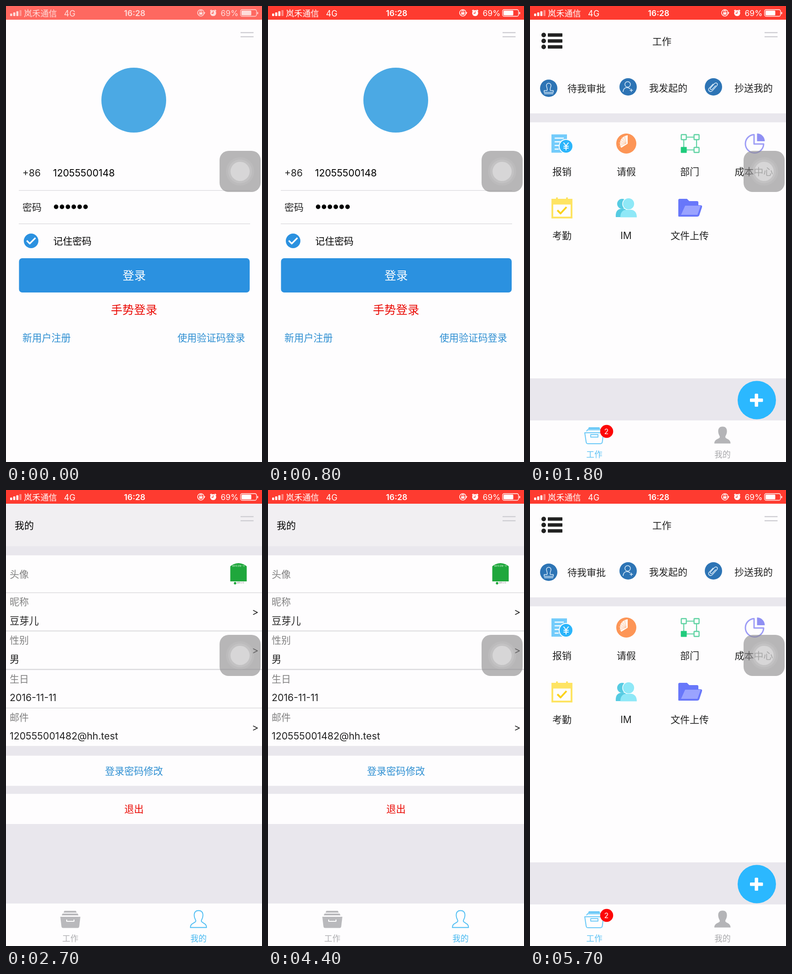
An HTML page for the animation above (5800 ms loop, 561 px wide and 998 px high).

```html
<!DOCTYPE html>
<html lang="zh-CN">
<head>
<meta charset="utf-8">
<title>App demo</title>
<style>
  html, body { margin: 0; width: 100%; height: 100%; overflow: hidden; background: #fefdfe; }
  svg { display: block; width: 100vw; height: 100vh; }
  text { font-family: Inter, "Noto Sans CJK SC", "Noto Sans CJK", sans-serif; }
</style>
</head>
<body>
<svg id="stage" viewBox="0 0 561 998" xmlns="http://www.w3.org/2000/svg"></svg>
<script>
const LOOP = 5800;
const PAPER = '#fefdfe', GRAY = '#e9e7ed', BLUE = '#2b91e0', INK = '#222', RED = '#ea0a04';

// Shape helpers
const attrs = o => Object.entries(o).map(([k, v]) => `${k}="${v}"`).join(' ');
const rect = (x, y, w, h, fill, extra = {}) =>
  `<rect x="${x}" y="${y}" width="${w}" height="${h}" fill="${fill}" ${attrs(extra)}/>`;
const dot = (x, y, r, fill, extra = {}) =>
  `<circle cx="${x}" cy="${y}" r="${r}" fill="${fill}" ${attrs(extra)}/>`;
const shape = (d, fill) => `<path d="${d}" fill="${fill}"/>`;
const line = (d, color, width = 2) =>
  `<path d="${d}" fill="none" stroke="${color}" stroke-width="${width}" stroke-linejoin="round"/>`;
// Text is placed by the middle of its glyph height
const text = (x, cy, size, str, fill = INK, anchor = 'start', weight = 400) =>
  `<text x="${x}" y="${cy + size * 0.37}" font-size="${size}" fill="${fill}" text-anchor="${anchor}" font-weight="${weight}">${str}</text>`;
const mid = (x, cy, size, str, fill, weight) => text(x, cy, size, str, fill, 'middle', weight);
const group = (id, body) => `<g id="${id}">${body}</g>`;

function loginPage() {
  const dots = Array.from({ length: 6 }, (_, i) => dot(109.8 + 12.9 * i, 439.5, 4.9, '#000')).join('');
  return dot(280, 206, 71, '#4ba9e4') +
    text(36, 365, 21, '+86') + text(103, 365, 21.3, '12055500148', '#000') +
    rect(28, 403, 507, 1.3, '#d9d9dc') +
    text(36, 440.5, 21, '密码') + dots +
    rect(28, 476, 507, 1.3, '#d9d9dc') +
    dot(55, 514, 16, BLUE) + line('M45.5 513.5L52 520L64.5 507.5', '#fff', 3.3) +
    text(103.5, 514.5, 21, '记住密码', '#000') +
    rect(28.5, 552, 505.5, 75, BLUE, { rx: 7 }) +
    mid(281, 589.5, 25.4, '登录', '#fff') +
    mid(280.5, 664.5, 25.4, '手势登录', RED) +
    text(36, 726.5, 21.2, '新用户注册', '#2e8fd2') +
    text(524, 726.5, 21.2, '使用验证码登录', '#2e8fd2', 'end');
}

function listIcon() {
  return [63.5, 76.5, 89.5].map(y => dot(30, y, 5, INK) + rect(39, y - 3.7, 32, 7.4, INK, { rx: 1 })).join('');
}

function shortcuts() {
  const disc = (x, y) => dot(x, y, 19, '#2d74b5');
  const pale = '#d9ecfa';
  return disc(41, 180) +
    line('M31 189V185H37.5C39 180 36 178 36 174A5 5 0 0 1 46 174C46 178 43 180 44.5 185H51V189Z M31 192H51', pale, 1.5) +
    disc(215, 177) +
    dot(214, 171.5, 6, 'none', { stroke: pale, 'stroke-width': 1.5 }) +
    line('M204 188C204 182 208 178.5 212 178.5C216 178.5 218 180 219.5 181.5 M222 181V188 M218.5 184.5H225.5', pale, 1.5) +
    disc(402, 177) +
    line('M396 179L404 170C408 166 413 170 409.5 174.5L399.5 185.5C395 190 388.5 184.5 392.5 180L401.5 170.5 M396 179C393.5 182 397 185 399.5 182L407 174', pale, 1.5) +
    text(82, 180, 21, '待我审批') + text(261, 179, 21, '我发起的') + text(448, 179, 21, '抄送我的');
}

function expenseIcon() {
  return rect(47, 281, 34, 40, '#74ccfb') +
    [[54, 288, 20], [54, 296, 16], [54, 304, 11], [54, 312, 9]].map(([x, y, w]) => rect(x, y, w, 2.4, '#fff')).join('') +
    dot(79, 307, 15, '#2bb5fb', { stroke: '#fff', 'stroke-width': 2 }) +
    line('M73.5 299L79 306L84.5 299 M79 306V316 M73.5 307H84.5 M73.5 311H84.5', '#fff', 1.9);
}

function leaveIcon() {
  const rays = [0, 1, 2, 3, 4].map(i => {
    const a = Math.PI * (0.9 + i * 0.13);
    return `M211 301L${211 + 17 * Math.cos(a)} ${301 + 17 * Math.sin(a)}`;
  }).join('');
  return dot(211, 301, 22, '#fd9556') +
    shape('M213.5 283V301L199.5 310A18 18 0 0 1 213.5 283Z', '#fff3eb') + line(rays, '#fdc39f', 1) +
    line('M213 283V301L199.5 309.5', '#fff', 2);
}

function deptIcon() {
  const green = '#5ed2a2';
  return line('M337 287H365V315H337Z', green, 2.2) +
    [[337, 287], [365, 287], [365, 315]].map(([x, y]) =>
      rect(x - 5.5, y - 5.5, 11, 11, PAPER, { stroke: green, 'stroke-width': 2.4, rx: 1 })).join('') +
    rect(330.5, 308.5, 13, 13, '#1fcb7c', { rx: 1 });
}

function costIcon() {
  return line('M491 281.5A20 20 0 1 0 512 302H491Z', '#9d9cf6', 3) +
    shape('M497.5 279A17 17 0 0 1 514.5 296H497.5Z', '#8f8ff3');
}

function calendarIcon() {
  const sun = '#fee463';
  return rect(47, 422, 46, 43, sun) + rect(51, 434.5, 38, 26.5, PAPER) +
    rect(57, 419, 4, 6, sun) + rect(79, 419, 4, 6, sun) +
    line('M60 447L67 454L80 440', '#fbd21c', 4);
}

function peopleIcon() {
  return dot(202, 433, 11, '#56cbe2') +
    shape('M188 462C187 451 191 445 199 444H210V462Z', '#56cbe2') +
    dot(216, 433, 13, '#8fe8f7', { stroke: '#fff', 'stroke-width': 1.5 }) +
    shape('M198 462.5C198 452 203 446.5 210 446H222C230 447 234 453 234 462.5Z', '#8fe8f7');
}

function folderIcon() {
  return shape('M325 460V425Q325 422 328 422H344L349 427H366Q369 427 369 430V436H373Q378 436 377 440L371 458Q370 461 366 461H327Q325 461 325 460Z', '#6877fa') +
    shape('M340 437H374L367 457H331Z', '#9aa3ff');
}

function gridLabels() {
  return [[70, 362, '报销'], [211, 362, '请假'], [350, 362, '部门'], [490.5, 362, '成本中心'],
    [70, 502.5, '考勤'], [210.5, 502, 'IM'], [350, 502.5, '文件上传']]
    .map(([x, y, s]) => mid(x, y, 21, s)).join('');
}

function drawerTab(active) {
  const sky = '#68c8f7', gray = '#b9b9bc';
  if (!active) {
    return shape('M128 921H153L155 925H126Z', gray) + shape('M124 927H157L159 931H122Z', gray) +
      shape('M119 934H163L160.5 955Q160 958.5 157 958.5H125Q122 958.5 121.5 955Z', gray) +
      line('M133 940V944H149V940', '#fff', 2) + mid(141, 981, 17.7, '工作', '#aeaeb1');
  }
  return shape('M129 922H152L154 926H127Z', sky) + line('M124 931L126 927.5H155L157 931', sky, 2) +
    line('M120 934H161L158.5 954Q158 958 154 958H127Q123.5 958 123 954Z', sky, 2) +
    line('M133 938V943.5H149V938Z', sky, 1.8) + mid(141, 981, 17.7, '工作', '#5cc2f5') +
    dot(168, 931, 14.3, '#fd0606') + mid(167.5, 931, 16, '2', '#fff');
}

function personTab(active) {
  const body = 'M422 920.5C429 920.5 432 925 431.5 932C431 938 428.5 940 428 943C428 948 439.5 947 439.5 957.5H404C404 947 416 948 416 943C415.5 940 413 938 412.5 932C412 925 415 920.5 422 920.5Z';
  return (active ? line(body, '#4dbdf3', 1.9) : shape(body, '#b4b4b7')) +
    mid(422, 981, 17.7, '我的', active ? '#45b8f0' : '#a8a8ab');
}

function workPage() {
  return rect(0, 30, 561, 968, PAPER) +
    listIcon() + mid(289, 77, 21, '工作') + shortcuts() +
    rect(0, 235, 561, 19.5, GRAY) +
    expenseIcon() + leaveIcon() + deptIcon() + costIcon() +
    calendarIcon() + peopleIcon() + folderIcon() + gridLabels() +
    rect(0, 815, 561, 92, GRAY) +
    dot(497, 862.5, 42, '#2bb8ff') +
    rect(482, 859, 28.5, 7.5, '#fff', { rx: 1.5 }) + rect(492.5, 848.5, 7.5, 28.5, '#fff', { rx: 1.5 }) +
    drawerTab(true) + personTab(false);
}

function avatar() {
  return shape('M491.5 200V167Q498 161 509.5 160Q521 161 527.5 167V200Z', '#1fa73c') +
    mid(509.5, 167, 4, '美好生活每一天', '#e4f6e6') +
    dot(502, 204, 2.7, '#1fa73c') + text(506, 204, 4, '绿叶小卡', '#777');
}

function minePage() {
  const rows = [[143, 81], [225.5, 82], [309.5, 82], [394, 82.5], [478, 82.5], [581.5, 66], [665, 66]];
  const fields = [[244.5, 286.5, '昵称', '豆芽儿'], [328.5, 370, '性别', '男'],
    [413.5, 454.5, '生日', '2016-11-11'], [497.5, 538.5, '邮件', '120555001482@hh.test']];
  return rect(0, 30, 561, 968, GRAY) + rect(0, 30, 561, 93, '#f1eff2') +
    text(19, 77, 21, '我的', '#000') +
    rect(0, 224, 561, 337, '#dcdbde') +
    rows.map(([y, h]) => rect(0, y, 561, h, PAPER)).join('') +
    text(8, 184, 21, '头像', '#808080') + avatar() +
    fields.map(([y1, y2, label, value]) => text(8, y1, 21, label, '#808080') + text(8, y2, 21.3, value)).join('') +
    [268, 352, 521].map(y => line(`M541.5 ${y - 4.8}L551 ${y}L541.5 ${y + 4.8}`, INK, 1.7)).join('') +
    mid(280.5, 615, 21.2, '登录密码修改', '#2e8fd2') + mid(280.5, 698.5, 21.2, '退出', RED) +
    rect(0, 905, 561, 93, PAPER) + drawerTab(false) + personTab(true);
}

function statusBar() {
  const bars = [0, 1, 2, 3].map(i =>
    rect(9 + 6.8 * i, 16.5 - 2.5 * i, 4.6, 5.5 + 2.5 * i, '#fff', { rx: 1, opacity: i < 3 ? 1 : 0.4 })).join('');
  const signs = bars +
    text(39, 16, 18.2, '岚禾通信', '#fff') + text(127, 16, 18, '4G', '#fff') +
    mid(282, 15.5, 17.7, '16:28', '#fff', 600) +
    dot(427, 15, 7, 'none', { stroke: '#fff', 'stroke-width': 1.6 }) +
    rect(423.5, 14, 7, 5, '#fff') + line('M425 14V12A2 2 0 0 1 429 12V14', '#fff', 1.3) +
    shape('M431.5 14H437L434 18Z', '#fff') +
    dot(454, 15.5, 6.6, '#fff') + line('M447.5 11L450.5 8.5 M457.5 8.5L460.5 11', '#fff', 2.2) +
    line('M454 11.5V16H450.5', '#fe3b30', 1.3) +
    text(470.5, 15.5, 17.5, '69%', '#fff') +
    rect(514, 8, 35, 14.5, 'none', { rx: 3.5, stroke: '#fff', 'stroke-width': 1.3 }) +
    rect(516, 10, 21.5, 10.5, '#fff', { rx: 1.5 }) + rect(550.5, 13, 2, 5, '#fff', { rx: 1 });
  return rect(0, 0, 561, 30, '#fe3b30') + rect(0, 0, 561, 30, '#fff', { id: 'veil' }) + group('signs', signs);
}

function floating() {
  return line('M514 58.3H542.5 M514 67.3H542.5', '#d0cfd4', 2.4) +
    rect(468, 317, 90, 90, '#8c8a8c', { rx: 20, opacity: 0.61 }) +
    dot(513, 362, 31, '#fff', { opacity: 0.07 }) +
    dot(513, 362, 26, '#fff', { opacity: 0.1 }) +
    dot(513, 362, 21, '#fff', { opacity: 0.32 });
}

document.getElementById('stage').innerHTML = rect(0, 0, 561, 998, PAPER) +
  group('login', loginPage()) + group('work', workPage()) + group('mine', minePage()) +
  floating() + statusBar();

const [login, work, mine, veil, signs] =
  ['login', 'work', 'mine', 'veil', 'signs'].map(id => document.getElementById(id));

// Each step holds until the next: start, page, form offset, status bar fade
const steps = [
  [0, login, 0, 0.23],
  [100, login, 0, 0.1],
  [200, login, 0, 0],
  [1000, login, 30, 0],
  [1200, work, 0, 0],
  [2600, mine, 0, 0],
  [4600, work, 0, 0],
];

function draw(now) {
  const t = now % LOOP;
  const [, page, offset, fade] = steps.filter(s => s[0] <= t).pop();
  for (const p of [login, work, mine]) p.style.display = p === page ? '' : 'none';
  login.setAttribute('transform', `translate(0 ${offset})`);
  veil.setAttribute('opacity', fade);
  signs.setAttribute('opacity', 1 - fade);
}

function tick() {
  draw(performance.now());
  requestAnimationFrame(tick);
}
tick();
</script>
</body>
</html>
```
